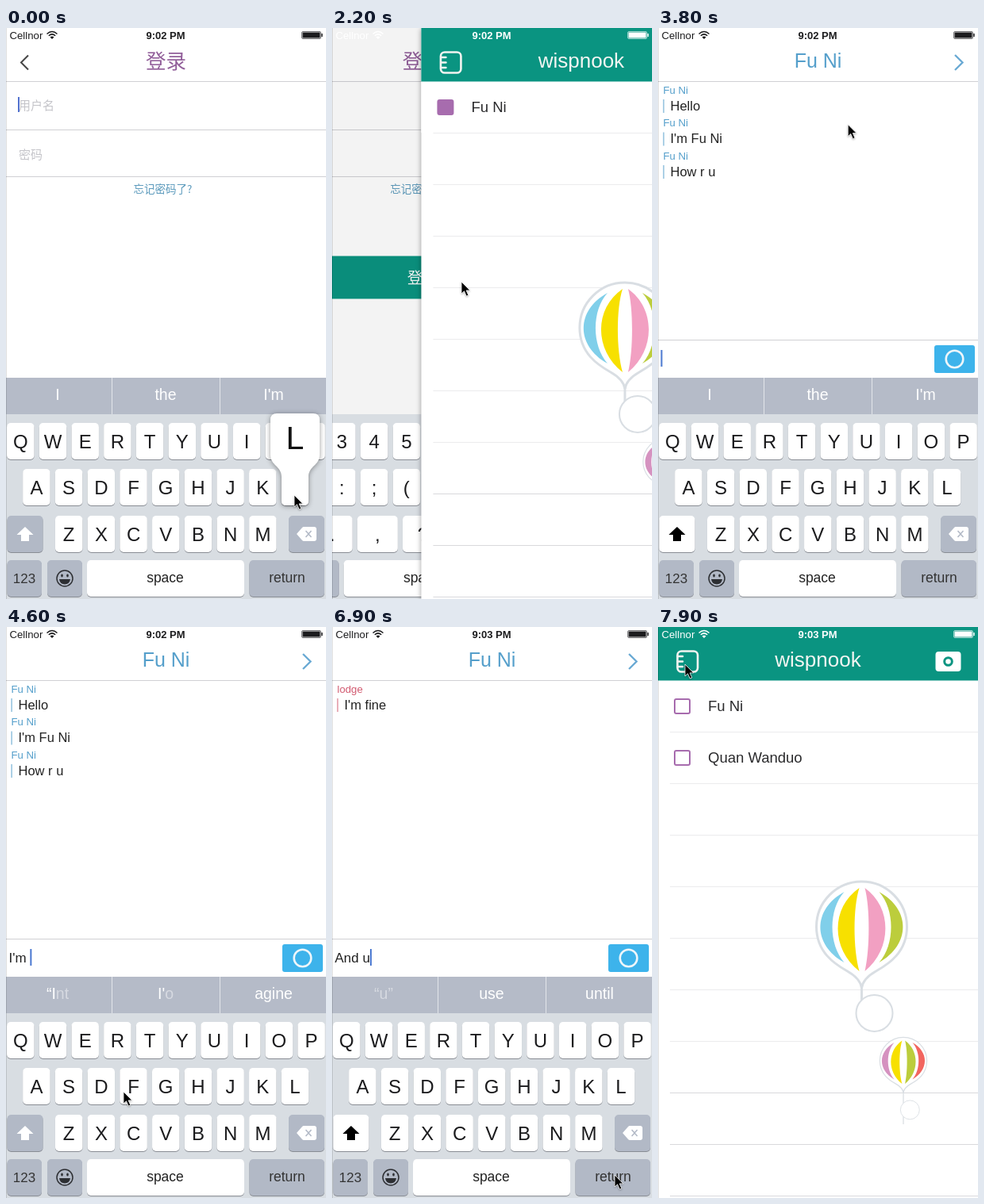
An HTML page that plays this animation: 403x720 px, repeating every 8 s.

```html
<!DOCTYPE html>
<html lang="zh">
<head>
<meta charset="utf-8">
<title>Chat app demo</title>
<style>
  html, body { margin: 0; width: 100%; height: 100%; overflow: hidden; background: #fff; }
  svg { display: block; width: 403px; height: 720px; }
  text { font-family: "Liberation Sans", Arial, sans-serif; white-space: pre; }
  .cjk { font-family: "Noto Sans CJK SC", "Noto Sans CJK", sans-serif; font-weight: 300; }
  .key { filter: drop-shadow(0 1px 0 #898d94); }
  .lift { filter: drop-shadow(0 1px 3px rgba(0, 0, 0, .4)); }
  .soft { filter: drop-shadow(0 1px 1px rgba(0, 0, 0, .3)); }
</style>
</head>
<body>
<svg id="stage" viewBox="0 0 403 720"></svg>
<script>
const LOOP = 8000, STEP = 100, W = 403;
const TEAL = '#0a9481', PURPLE = '#a76cae', BLUE = '#559fcb', RED = '#d25a70', KEY = '#b2b9c6';
const ME = 'lodge', FRIEND = 'Fu Ni', OTHER = 'Quan Wanduo';

// ---------- drawing helpers ----------
function el(parent, tag, attrs = {}, text) {
  const n = document.createElementNS('http://www.w3.org/2000/svg', tag);
  for (const k in attrs) n.setAttribute(k, attrs[k]);
  if (text !== undefined) n.textContent = text;
  parent.appendChild(n);
  return n;
}
const group = (p, attrs) => el(p, 'g', attrs);
const rect = (p, x, y, width, height, fill, more) => el(p, 'rect', { x, y, width, height, fill, ...more });
const path = (p, d, attrs) => el(p, 'path', { d, fill: 'none', ...attrs });
const label = (p, x, y, size, fill, s, more) => el(p, 'text', { x, y, 'font-size': size, fill, ...more }, s);
const MID = { 'text-anchor': 'middle' };
const CJK = { class: 'cjk' };
const show = (n, on) => n.setAttribute('display', on ? 'inline' : 'none');
const move = (n, x, y = 0) => n.setAttribute('transform', `translate(${x} ${y})`);
const setText = (n, s) => { if (n.textContent !== s) n.textContent = s; };

// ---------- timing helpers ----------
const progress = (t, a, b) => Math.min(1, Math.max(0, (t - a) / (b - a)));
const smooth = u => u * u * (3 - 2 * u);
const easeOut = u => 1 - (1 - u) ** 3;
const stepAt = (table, t) => table.reduce((v, [at, s]) => (t >= at ? s : v), table[0][1]);
function track(table, t) {
  let i = 0;
  while (i < table.length - 2 && t >= table[i + 1][0]) i++;
  const [a, ...p] = table[i], [b, ...q] = table[i + 1];
  const u = smooth(progress(t, a, b));
  return p.map((v, k) => v + (q[k] - v) * u);
}

// ---------- keyboard ----------
function keyboard(parent) {
  const root = group(parent), keys = {};
  const bar = group(root);
  rect(bar, 0, 441, W, 46, '#b5bbc8');
  rect(bar, 133, 441, 1, 46, '#e2e5ea');
  rect(bar, 269, 441, 1, 46, '#e2e5ea');
  const words = [65, 201, 337].map(x => label(bar, x, 469, 19.5, '#fff', '', MID));
  rect(root, 0, 487, W, 233, '#d8dde2');

  const cap = (p, x, y, w, fill = '#fff') => rect(p, x, y, w, 46, fill, { rx: 5, class: 'key' });
  function row(p, chars, x0, y, gap = 40.7, w = 34.5) {
    [...chars].forEach((c, i) => {
      const x = x0 + i * gap;
      cap(p, x - w / 2, y, w);
      label(p, x, y + 31.5, 24, '#1b1b1d', c, MID);
      keys[c] = [x, y];
    });
  }
  const alpha = group(root), digits = group(root);
  row(alpha, 'QWERTYUIOP', 18.3, 498);
  row(alpha, 'ASDFGHJKL', 38.4, 556);
  row(alpha, 'ZXCVBNM', 79.2, 615);
  row(digits, '1234567890', 18.3, 498);
  row(digits, '-/:;()$&@"', 18.3, 556);
  row(digits, ".,?!'", 87.5, 615, 57.1, 51);

  const shiftCap = cap(alpha, 1.5, 615, 45, KEY);
  const arrow = path(alpha, 'M24 629l10.500 10h-5.500v8h-10v-8h-5.500z');
  cap(digits, 1.5, 615, 45, KEY);
  label(digits, 24, 643, 15, '#333', '#+=', MID);
  cap(root, 356, 615, 45, KEY);
  path(root, 'M366 638l7-8q1-1 2-1h13q3 0 3 3v12q0 3-3 3h-13q-1 0-2-1z', { fill: '#fff' });
  path(root, 'M377.500 634l7 8m0-8l-7 8', { stroke: KEY, 'stroke-width': 1.5 });

  const narrow = group(root), wide = group(root);
  cap(narrow, 1.5, 671, 43.5, KEY);
  label(narrow, 23, 700, 17, '#333', '123', MID);
  cap(narrow, 52, 671, 44, KEY);
  el(narrow, 'circle', { cx: 74, cy: 694, r: 10, fill: 'none', stroke: '#2d2f33', 'stroke-width': 1.5 });
  for (const cx of [70.5, 77.5]) el(narrow, 'ellipse', { cx, cy: 690.5, rx: 1.3, ry: 2, fill: '#2d2f33' });
  path(narrow, 'M67 695h14q-1 6.500-7 6.500t-7-6.500z', { fill: '#2d2f33' });
  cap(wide, 1.5, 671, 94.5, KEY);
  const mode = label(wide, 49, 700, 17, '#333', '', MID);
  cap(root, 102, 671, 198, '#fff');
  label(root, 200.5, 699, 17.5, '#222', 'space', MID);
  cap(root, 306.5, 671, 94.5, KEY);
  label(root, 354, 699, 17.5, '#333', 'return', MID);

  const pop = group(root, { class: 'lift' });
  path(pop, 'M-23-70h46q8 0 8 8v44c0 14-14 14-14 28v30q0 6-6 6h-22q-6 0-6-6v-30c0-14-14-14-14-28v-44q0-8 8-8z', { fill: '#fff' });
  const popChar = label(pop, 0, -25, 41, '#111', '', MID);

  return {
    root,
    set({ hints, numeric, shift, secure, pressed }) {
      show(bar, !!hints);
      if (hints) hints.split(',').forEach((h, i) => {
        if (words[i].dataset.word === h) return;
        words[i].dataset.word = h;
        const [bright, dim] = h.split('~');       // the part after ~ is faded
        words[i].textContent = bright;
        if (dim) el(words[i], 'tspan', { 'fill-opacity': .45 }, dim);
      });
      show(alpha, !numeric);
      show(digits, numeric);
      show(narrow, !secure);
      show(wide, secure);
      setText(mode, numeric ? 'ABC' : '123');
      shiftCap.setAttribute('fill', shift ? '#fff' : KEY);
      arrow.setAttribute('fill', shift ? '#000' : '#fff');
      const key = keys[pressed];
      show(pop, !!key);
      if (key) { move(pop, ...key); setText(popChar, pressed); }
    }
  };
}

// ---------- log-in page ----------
function loginPage(root) {
  const g = group(root);
  rect(g, 0, 0, W, 720, '#fff');
  path(g, 'M28 34.500l-9 9 9 9', { stroke: '#444', 'stroke-width': 2 });
  label(g, 201.5, 50.5, 25.5, '#925f9a', '登录', { ...MID, ...CJK });
  for (const y of [67, 128, 187]) rect(g, 0, y, W, 1, '#d0d0d4');
  const hints = [[102.5, '用户名'], [164.5, '密码']].map(([y, s]) => label(g, 16, y, 15, '#c4c4c9', s, CJK));
  const user = label(g, 15.5, 102.5, 15.5, '#222', '');
  const pass = label(g, 15.5, 165, 18, '#222', '');
  label(g, 197.5, 207.5, 13.5, '#5b9abc', '忘记密码了?', { ...MID, ...CJK });
  const button = group(g);
  rect(button, 0, 287.5, W, 54, TEAL);
  label(button, 201.5, 321.5, 19.5, '#fff', '登录', { ...MID, ...CJK });
  const caret = rect(g, 15, 87, 2, 19, '#5272cf');
  const shade = rect(g, 0, 0, W, 720, '#000', { opacity: 0 });
  const kb = keyboard(g);
  return { g, hints, user, pass, button, caret, kb, shade };
}

// ---------- friend list ----------
function balloon(p, x, y, k, colors, line, string, dot) {
  const g = group(p, { transform: `translate(${x} ${y}) scale(${k})` });
  const pen = { stroke: '#d9dee3', 'stroke-width': line };
  path(g, `M0 75V${string}`, pen);
  path(g, 'M0-57C32-57 57-31 57 0C57 32 34 47 18 56Q2 65 0 77Q-2 65-18 56C-34 47-57 32-57 0C-57-31-32-57 0-57z', { ...pen, fill: '#fff' });
  // Each panel lies between two bulging curves that share their end points.
  [[-22, -44, 45, -52, -37], [-3, -49, 56, -30, -9], [4, -49, 56, 30, 9], [22, -44, 45, 52, 37]].forEach(([x0, top, end, a, b], i) => {
    const [ca, cb] = [a, b].map(v => x0 + (v - x0) * 4 / 3), [y1, y2] = [top * .5, end * .5];
    path(g, `M${x0} ${top}C${ca} ${y1} ${ca} ${y2} ${x0} ${end}C${cb} ${y2} ${cb} ${y1} ${x0} ${top}z`, { fill: colors[i] });
  });
  el(g, 'circle', { cx: 16, cy: dot, r: 23, fill: '#fff', ...pen, 'stroke-width': line * .7 });
}

function listPage(root) {
  const g = group(root);
  rect(g, 0, 0, W, 720, '#fff', { class: 'lift' });
  for (let i = 0; i < 10; i++) rect(g, 15, 132 + i * 65, W - 15, 1, i > 6 ? '#d9d9dc' : '#ebebed');
  balloon(g, 256.5, 378, 1, ['#80cfea', '#f7e000', '#f2a0c2', '#bccd3c'], 3, 108, 109);
  balloon(g, 309, 547, .52, ['#d592c0', '#f7e000', '#bccd3c', '#f2655f'], 2.4, 154, 119);

  const action = group(g);
  rect(action, 0, 67.5, 56.5, 64.5, '#35a5e2');
  path(action, 'M21 88h19v24l-6-5h-13z', { stroke: '#f4ece8', 'stroke-width': 2.4, 'stroke-linejoin': 'round' });
  const rows = [FRIEND, OTHER].map((name, i) => {
    const r = group(g), y = 100 + i * 65;
    if (!i) rect(r, 0, 68, W, 64, '#fff');
    const box = rect(r, 21, y - 9, 19, 18, '#fff', { rx: 2, stroke: PURPLE, 'stroke-width': 2 });
    label(r, 63, y + 6, 18.5, '#2a2a2c', name);
    return { r, box };
  });

  rect(g, 0, 0, W, 67.5, TEAL);
  label(g, 201.5, 50, 26, '#f4f5f2', 'wispnook', MID);
  const pen = { stroke: '#f2f3f0', 'stroke-width': 2.6 };
  rect(g, 24.5, 30.5, 25.5, 26, 'none', { rx: 5, ...pen });
  for (const y of [37, 43.5, 50]) path(g, `M25 ${y}h6`, { ...pen, 'stroke-linecap': 'round' });
  rect(g, 349.5, 31, 32, 25, '#fff', { rx: 4 });
  el(g, 'circle', { cx: 365.5, cy: 43.5, r: 4.8, fill: 'none', stroke: TEAL, 'stroke-width': 3 });
  return { g, rows, action };
}

// ---------- chat ----------
function chatPage(root) {
  const g = group(root);
  rect(g, 0, 0, W, 720, '#fff');
  label(g, 201.5, 50, 25, BLUE, FRIEND, MID);
  path(g, 'M374 34l9.500 9.500-9.500 9.500', { stroke: '#6aaad4', 'stroke-width': 2.4 });
  rect(g, 0, 67, W, 1, '#d0d0d4');
  const message = (p, i, who, color, s) => {
    const y = 78 + i * 41.5;
    label(p, 6.5, y + 4.5, 13.2, color, who);
    rect(p, 6.5, y + 12, 1.2, 17, color, { opacity: .8 });
    label(p, 15.5, y + 25.5, 16.5, '#222', s);
  };
  const theirs = group(g), mine = group(g), reply = group(g);
  ['Hello', `I'm ${FRIEND}`, 'How r u'].forEach((s, i) => message(theirs, i, FRIEND, BLUE, s));
  message(mine, 0, ME, RED, "I'm fine");
  message(reply, 1, ME, RED, 'And u');

  const bar = group(g);
  rect(bar, 0, 393, W, 48, '#fff');
  rect(bar, 0, 393, W, 1, '#d0d0d4');
  const input = label(bar, 3.5, 423, 17, '#222', '');
  const caret = rect(bar, 0, 406, 2, 21, '#4a78d0');
  rect(bar, 348, 400, 51, 35, '#3db3eb', { rx: 3 });
  el(bar, 'circle', { cx: 373.5, cy: 417.5, r: 10.8, fill: 'none', stroke: '#eef6fa', 'stroke-width': 2.6 });
  const kb = keyboard(g);
  return { g, theirs, mine, reply, bar, input, caret, kb };
}

// ---------- status bar and pointer ----------
function statusBar(root) {
  const g = group(root);
  label(g, 4.5, 13.5, 13.2, 'currentColor', 'Cellnor');
  path(g, 'M51.500 7.500q6.500-6 13 0M53.800 9.800q4.200-3.800 8.400 0', { stroke: 'currentColor', 'stroke-width': 1.5 });
  path(g, 'M55.500 11.500q2.500-2 5 0l-2.500 2.500z', { fill: 'currentColor' });
  const clock = label(g, 201, 13.5, 13, 'currentColor', '', { ...MID, 'font-weight': 700 });
  rect(g, 372.5, 4.5, 24, 9, 'none', { rx: 1.5, stroke: 'currentColor', 'stroke-opacity': .6 });
  rect(g, 373.5, 5.5, 22, 7, 'currentColor');
  rect(g, 397.3, 7, 1.4, 4, 'currentColor');
  return { g, clock };
}

const stage = document.getElementById('stage');
const login = loginPage(stage), list = listPage(stage), chat = chatPage(stage), status = statusBar(stage);
rect(stage, 0, 0, 1, 720, '#000', { opacity: .12 });
const pointer = path(stage, 'M0 0v15l3.500-3.200 2.700 6.200 2.600-1.100-2.700-6h4.700z',
  { fill: '#000', stroke: '#fff', 'stroke-width': .8, class: 'soft' });

// ---------- script ----------
const pointerTrack = [
  [0, 363, 589], [100, 363, 589], [200, 345, 522], [300, 343, 522], [400, 120, 581], [500, 201, 581],
  [600, 99, 522], [800, 70, 165], [900, 88, 287], [1100, 48, 692], [1200, 48, 692], [1300, 18, 522],
  [1500, 59, 522], [1700, 100, 522], [1900, 163, 320], [2400, 163, 320], [2800, 150, 112],
  [3100, 213, 118], [3200, 235, 120], [4000, 240, 122], [4200, 337, 465], [4300, 337, 465],
  [4600, 148, 586], [4700, 160, 582], [4900, 302, 522], [5200, 283, 640], [5400, 99, 522],
  [5600, 354, 692], [5700, 354, 692], [5900, 38, 582], [6100, 283, 640], [6300, 120, 582],
  [6500, 200, 692], [6700, 262, 522], [6900, 356, 691], [7000, 356, 691], [7200, 378, 45],
  [7500, 378, 45], [7900, 34, 47]];
const presses = [[0, 'L'], [200, 'O'], [400, 'D'], [500, 'G'], [600, 'E'], [1300, '1'], [1500, '2'], [1700, '3'],
  [4700, 'F'], [4900, 'I'], [5200, 'N'], [5400, 'E'], [5900, 'A'], [6100, 'N'], [6300, 'D'], [6700, 'U']];
const draft = [[0, ''], [4300, "I'm "], [4800, "I'm f"], [5000, "I'm fi"], [5300, "I'm fin"], [5500, "I'm fine"],
  [5700, ''], [6000, 'A'], [6200, 'An'], [6400, 'And'], [6500, 'And '], [6800, 'And u'], [7000, '']];
const chatHints = [[0, "I,the,I'm"], [4300, "“I~nt,I'~o,agine"], [4800, '“f”,for,from'], [5000, '“fi”,fine,find'],
  [5300, '“fin”,fine,find'], [5500, '“fine”,fine,finest'], [5700, "I,the,I'm"], [6000, '“A”,and,at'],
  [6200, '“An”,and,any'], [6400, '“And”,and,any'], [6500, 'I,the,then'], [6800, '~“u”,use,until'], [7000, "I,the,I'm"]];
const swipe = [[2800, 0], [3100, 58], [3200, 75], [3300, 75], [3600, 0]];

function draw(t) {
  const hit = presses.find(([at]) => t >= at && t < at + STEP);
  const pressed = hit && hit[1];
  const count = (from, to) => presses.filter(([at]) => at >= from && at < to && t >= at + STEP).length;
  const push = easeOut(progress(t, 2000, 2577));
  const open = smooth(progress(t, 3200, 3600)) - smooth(progress(t, 7100, 7500));

  const secure = t >= 800, letters = count(0, 1000), dots = count(1000, 2000);
  show(login.g, push < 1);
  move(login.g, -121 * push);
  login.shade.setAttribute('opacity', .065 * push);
  setText(login.user, ME.slice(0, letters));
  setText(login.pass, '•'.repeat(dots));
  show(login.hints[0], !letters);
  show(login.hints[1], !dots);
  show(login.button, dots > 0);
  show(login.caret, t < 2000);
  const field = secure ? login.pass : login.user;
  const typed = push < 1 && field.textContent ? field.getComputedTextLength() + 1 : 0;
  move(login.caret, typed, secure ? 62 : 0);
  login.kb.set({ hints: secure ? '' : "I,the,I'm", numeric: t >= 1200, shift: false, secure, pressed });

  const [slide] = track(swipe, t);
  show(list.g, push > 0 && open < 1);
  move(list.g, W * (1 - push) + W * open);
  move(list.rows[0].r, slide);
  show(list.action, slide > 0);
  list.rows[0].box.setAttribute('fill', t < 4000 ? PURPLE : '#fff');
  show(list.rows[1].r, t >= 2600);

  const rise = 279 * (1 - easeOut(progress(t, 3400, 3800)));
  show(chat.g, open > 0);
  move(chat.g, W * (open - 1));
  move(chat.kb.root, 0, rise);
  move(chat.bar, 0, rise);
  const sent = t >= 5700;
  show(chat.theirs, !sent);
  show(chat.mine, sent);
  show(chat.reply, t >= 7000);
  setText(chat.input, stepAt(draft, t));
  if (open > 0) move(chat.caret, 3.5 + chat.input.getComputedTextLength());
  chat.kb.set({ hints: stepAt(chatHints, t), numeric: false, shift: t < 4300 || sent, secure: false, pressed });

  const light = push > 0 && open < .5;
  status.g.setAttribute('color', light ? '#fff' : '#1c1c1e');
  setText(status.clock, t < 6000 ? '9:02 PM' : '9:03 PM');
  move(pointer, ...track(pointerTrack, t));
}

const start = performance.now();
function tick() {
  const t = (performance.now() - start) % LOOP;
  draw(Math.floor(t / STEP) * STEP);
  requestAnimationFrame(tick);
}
tick();
</script>
</body>
</html>
```
